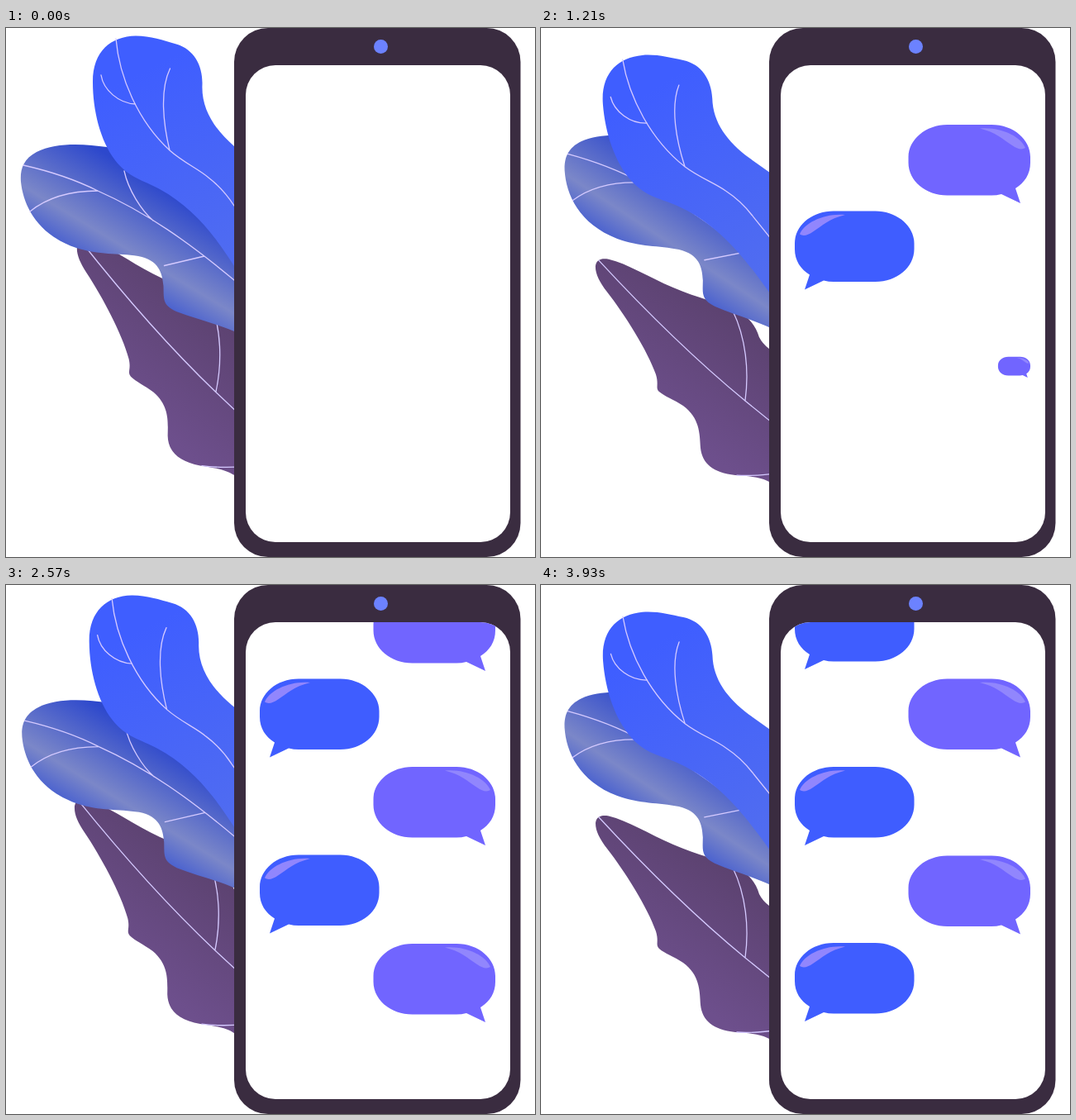
An HTML page for the animation above (4000 ms loop, 640 by 640 pixels).

```html
<!DOCTYPE html>
<html lang="en">
<head>
<meta charset="utf-8">
<title>Chat on a phone</title>
<style>
  html, body { margin: 0; height: 100%; overflow: hidden; background: #fff; }
  svg { display: block; width: 100vw; height: 100vh; }
  .vein { fill: none; stroke: #d5caff; stroke-width: 1.3; stroke-linecap: round; }
</style>
</head>
<body>
<svg viewBox="0 0 640 640">
  <defs>
    <linearGradient id="blue" gradientUnits="userSpaceOnUse" x1="150" y1="60" x2="270" y2="290">
      <stop stop-color="#3f5eff"/><stop offset="1" stop-color="#506cf0"/>
    </linearGradient>
    <linearGradient id="steel" gradientUnits="userSpaceOnUse" x1="34" y1="258" x2="104" y2="142">
      <stop stop-color="#3652d2"/><stop offset=".37" stop-color="#7b87c8"/><stop offset="1" stop-color="#2d48cc"/>
    </linearGradient>
    <linearGradient id="plum" gradientUnits="userSpaceOnUse" x1="240" y1="350" x2="150" y2="480">
      <stop stop-color="#5c4270"/><stop offset="1" stop-color="#6d4f8c"/>
    </linearGradient>
    <clipPath id="screen"><rect x="290" y="45" width="320" height="577" rx="36"/></clipPath>
  </defs>

  <g id="low">
    <path fill="url(#plum)" d="M66 288C67 280 73 278 82 279.500C105 285 130 301 160 314C190 327 215 332 235 341C253 350 260 361 264 374Q268 382 276 388L330 430V570L276 549C268 544 252 542 235 541C208 538 195 527 193 508C192 490 192 472 172 457C160 449 150 446 143 440C138 435 143 432 139 419C129 390 101 346 80 319C71 307 66 298 66 288Z"/>
    <path class="vein" d="M70 281C130 346 190 404 247 451L310 502M232 342C248 375 252 415 247 451M237 541Q258 542.500 290 538"/>
  </g>
  <g id="middle">
    <path fill="url(#steel)" d="M122 144C95 140 60 138 37 150C20 159 17 172 18 186C21 215 38 250 85 266C113 275 135 272 160 276C185 281 189 296 190.500 312C191 328 189 335 206 343C230 352 255 358 276 367L330 388V300L200 165Z"/>
    <path class="vein" d="M21 166C52 173 85 184 111 197C170 223 222 260 276 305L300 325M29 222C50 205 77 197 111 197M143 173C148 196 164 221 178 233M191.500 287.500L240 276"/>
  </g>
  <g id="top">
    <path fill="url(#blue)" d="M105 65C105 28 127 10 157 9.500C175 9.500 190 15 206 19.500C228 26 238 46 237.500 68C236 98 252 122 276 143L330 188V375L276 288C252 250 226 217 186 195C166 184 148 181 132 160C114 136 105 100 105 65Z"/>
    <path class="vein" d="M133 13C137 60 160 113 198 148C215 163 232 170 245 181C258 191 267 201 276 215L300 250M115 57C118 75 136 91 156.500 92M198.500 49C186 75 190 115 198 148"/>
  </g>

  <rect x="276" width="346.500" height="640" rx="41" fill="#3a2c40"/>
  <rect x="290" y="45" width="320" height="577" rx="36" fill="#fff"/>
  <circle cx="453.500" cy="22.500" r="8.500" fill="#6c82ff"/>
  <g clip-path="url(#screen)"><g id="chat"></g></g>
</svg>
<script>
const el = id => document.getElementById(id);
const LOOP = 4000, LAST = 3930, POP = 400;

// Tail corner sits at the origin; the left-hand bubbles are mirrored.
function bubbleMarkup(w, fill) {
  return `<path fill="${fill}" d="M-47 -95C-20 -95 0 -77 0 -56V-49C0 -35 -7 -25 -18 -18L-12 0L-35 -11Q-41 -9.5 -47 -9.5
    H${47 - w}C${21 - w} -9.5 ${-w} -27 ${-w} -49V-56C${-w} -77 ${21 - w} -95 ${47 - w} -95Z"/>
    <path fill="#9186fd" d="M-61 -90.5C-37 -93 -11 -81 -6 -67Q-12 -63 -22 -70C-33 -77 -42 -86 -61 -90.5Z"/>`;
}

const bubbles = [[117, 304], [221.5, 704], [328, 1104], [434.5, 1506], [542, 2094], [647.5, 2880]]
  .map(([y, start], i) => {
    const node = document.createElementNS('http://www.w3.org/2000/svg', 'g');
    const left = i % 2;
    node.innerHTML = left ? bubbleMarkup(144.5, '#3f5dff') : bubbleMarkup(147.5, '#7165ff');
    el('chat').append(node);
    return { node, start, left, x: left ? 307 : 592, y: y + 95 };
  });

const sway = [[0, 0], [1200, 1.015], [2374, .016], [LAST, 1]];
const scroll = [[1900, 0], [2000, 21], [2386, -108], [2686, -108], [2786, -87], [3172, -214.5]];

function along(keys, t) {
  if (t <= keys[0][0]) return keys[0][1];
  for (let i = 1; i < keys.length; i++) {
    const [t0, a] = keys[i - 1], [t1, b] = keys[i];
    if (t < t1) return a + (b - a) * (t - t0) / (t1 - t0);
  }
  return keys.at(-1)[1];
}

const rotate = (id, angle, x, y) => el(id).setAttribute('transform', `rotate(${angle} ${x} ${y})`);

function draw(now) {
  const t = now % LOOP, s = along(sway, t);
  rotate('top', -4.4 * s, 442, 468);
  rotate('middle', 2.3 * s, 362, 441);
  rotate('low', 4.4 * (1 - s), 386, 535);
  el('chat').setAttribute('transform', `translate(0 ${along(scroll, t)})`);
  for (const { node, start, left, x, y } of bubbles) {
    const k = Math.min(1, Math.max(0, (t - start) / POP));
    node.setAttribute('visibility', k ? 'visible' : 'hidden');
    node.setAttribute('transform', `translate(${x} ${y}) scale(${left ? -k : k} ${k})`);
  }
}

let begin;
function tick(now) {
  begin ??= now;
  draw(now - begin);
  requestAnimationFrame(tick);
}
draw(0);
requestAnimationFrame(tick);
</script>
</body>
</html>
```
